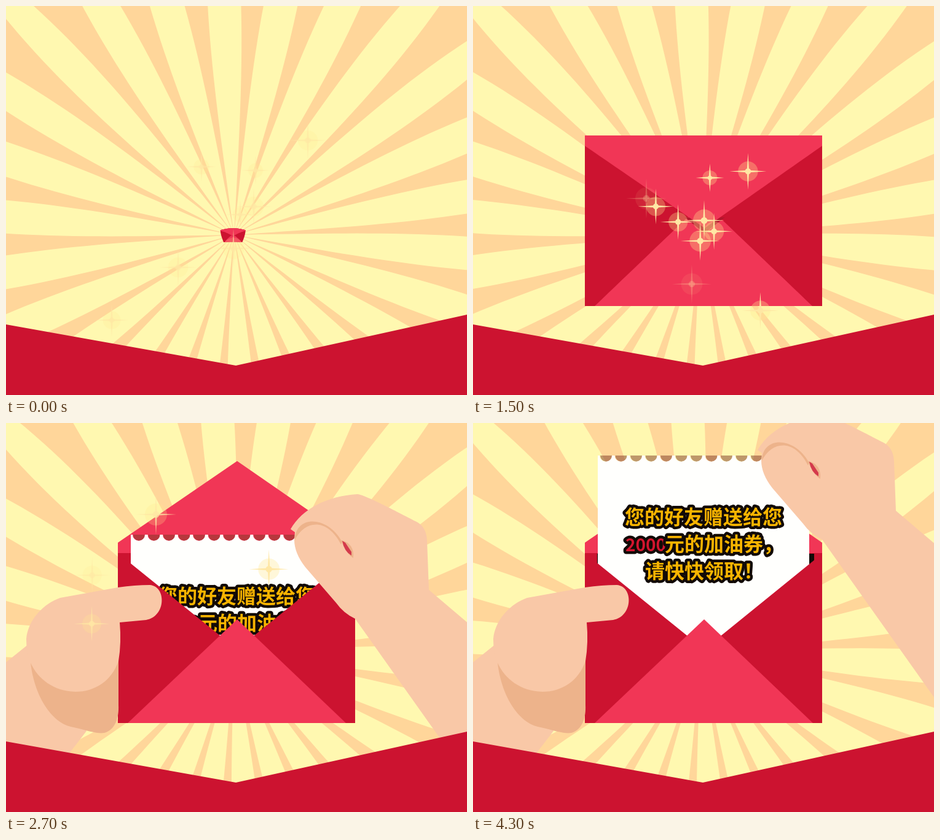
Recreate the animation shown at these times as an HTML page with a canvas. Size 750 px wide and 634 px high, loop 4.4 s.

```html
<!DOCTYPE html>
<html lang="zh">
<head>
<meta charset="utf-8">
<style>
html, body { margin: 0; width: 100%; height: 100%; overflow: hidden; background: #cc1330; }
canvas { display: block; }
</style>
</head>
<body>
<canvas id="stage" width="750" height="634"></canvas>
<script>
const ctx = document.getElementById('stage').getContext('2d');
const LOOP = 4400, STEP = 100;
const RED = '#cc1330', PINK = '#f13656', SKIN = '#f9c8a7', SHADE = '#edb38b';
const FONT = '"Noto Sans CJK SC", "Noto Sans CJK", sans-serif';

const clamp = x => Math.max(0, Math.min(1, x));
const mix = (a, b, p) => a + (b - a) * p;
const ramp = (t, from, to) => clamp((t - from) / (to - from));
const smooth = (t, from, to) => { const p = ramp(t, from, to); return p * p * (3 - 2 * p); };

// Interpolates [time, value] pairs
function along(keys, t) {
  let i = 0;
  while (i < keys.length - 2 && t >= keys[i + 1][0]) i++;
  const [t0, a] = keys[i], [t1, b] = keys[i + 1];
  return mix(a, b, ramp(t, t0, t1));
}

function poly(points, color) {
  ctx.beginPath();
  points.forEach(([x, y]) => ctx.lineTo(x, y));
  ctx.fillStyle = color;
  ctx.fill();
}

function shape(path, color) {
  ctx.fillStyle = color;
  ctx.fill(new Path2D(path));
}

function disc(x, y, r) {
  ctx.beginPath();
  ctx.arc(x, y, r, 0, 7);
  ctx.fill();
}

function shifted(dx, dy, draw) {
  ctx.save();
  ctx.translate(dx, dy);
  draw();
  ctx.restore();
}

// Sunburst: 26 stripes that widen with distance from the centre
const turnKeys = [[0, -2.4], [6, -13.8], [11, -23.5], [20, -38.2], [27, -45.6], [38, -65.7], [43, -72.5]];

function drawRays(t) {
  const period = 360 / 26, turn = along(turnKeys, t);
  ctx.fillStyle = '#fff8b0';
  ctx.fillRect(0, 0, 750, 634);
  for (let k = 0; k < 26; k++) {
    const middle = turn + (k + 0.5) * period, left = [], right = [];
    for (let r = 0; r <= 680; r += 20) {
      const half = Math.min(13, 2.86 + 9.9e-7 * r ** 2.5) / 2;
      const at = deg => [371 + r * Math.sin(deg * Math.PI / 180), 373 - r * Math.cos(deg * Math.PI / 180)];
      left.push(at(middle - half));
      right.unshift(at(middle + half));
    }
    poly(left.concat(right), '#ffd69a');
  }
}

// Closed envelope, bent while it flies in and flat afterwards
function drawClosed(t) {
  const k = Math.min(1, (41 + 25.4 * t + 1.9 * t * t) / 550);
  const flat = smooth(t, 11, 15), bend = 1 - flat;
  const cx = mix(369 + 3 * k, 375, flat);
  const halfTop = mix(275 * k, 193, flat), halfBottom = mix(203 * k, 193, flat);
  const top = mix(375 - 172 * k, 211, flat), bottom = mix(375 + 128 * k, 489, flat);
  const place = (u, v) => {
    const half = mix(halfTop, halfBottom, v ** 1.6);
    const y = mix(top + 41 * k * bend * u * u, bottom + 7 * k * bend * u * u, v);
    return [cx + u * half, y + 0.035 * bend * (bottom - top) * Math.sin(Math.PI * v) * (1 - u * u)];
  };
  const panel = (corners, color) => {
    const points = [];
    corners.forEach(([u, v], i) => {
      const [u2, v2] = corners[(i + 1) % corners.length];
      for (let s = 0; s < 16; s++) points.push(place(mix(u, u2, s / 16), mix(v, v2, s / 16)));
    });
    poly(points, color);
  };
  panel([[-1, 0], [1, 0], [1, 1], [-1, 1]], RED);
  panel([[-0.917, 1], [0, 0.39], [0.917, 1]], PINK);
  panel([[-0.16, 0.48], [0.01, 0.572], [0.18, 0.48]], '#b3162d');
  panel([[-1, 0], [1, 0], [1, 0.061], [0.01, 0.543], [-1, 0.061]], PINK);
}

function drawLine(text, x, y, color, size) {
  ctx.font = `700 ${size}px ${FONT}`;
  ctx.fillStyle = color;
  ctx.strokeText(text, x, y);
  ctx.fillText(text, x, y);
}

function drawCard() {
  const notches = Array.from({ length: 14 }, (_, i) => 216 + 24.5 * i);
  ctx.fillStyle = 'rgba(125, 55, 35, .5)';
  notches.forEach(x => {
    ctx.beginPath();
    ctx.arc(x + 1, 182, 10, 0, Math.PI);
    ctx.fill();
  });
  ctx.beginPath();
  ctx.moveTo(203, 182);
  notches.forEach(x => ctx.arc(x, 182, 10, Math.PI, 0, true));
  ctx.lineTo(547, 182);
  ctx.lineTo(547, 520);
  ctx.lineTo(203, 520);
  ctx.fillStyle = '#fffffd';
  ctx.fill();

  ctx.strokeStyle = '#120a06';
  ctx.lineWidth = 9;
  ctx.lineJoin = 'round';
  const gold = '#f8b400';
  drawLine('您的好友赠送给您', 247, 294, gold, 32);
  drawLine('2000', 248, 338, '#d4152f', 28);
  drawLine('元的加油券，', 312, 338, gold, 32);
  drawLine('请快快领取！', 280, 382, gold, 32);
}

function drawOpen(t, lift) {
  const p = smooth(t, 20, 24);
  const shoulder = mix(228, 195, p), apex = mix(362, 62, p);
  const flap = () => poly([[182, 212], [182, shoulder], [376, apex], [568, shoulder], [568, 212]], PINK);
  ctx.fillStyle = RED;
  ctx.fillRect(182, 211, 386, 278);
  if (apex <= 212) flap();
  if (t >= 24) {
    if (lift < -60) {
      ctx.fillStyle = '#120a06';
      ctx.fillRect(202, 213, 353, 17);
    }
    ctx.save();
    ctx.beginPath();
    ctx.rect(0, 0, 750, 489);
    ctx.clip();
    shifted(0, lift, drawCard);
    ctx.restore();
  }
  poly([[182, 212], [376, 369], [568, 213], [568, 489], [182, 489]], RED);
  poly([[198, 489], [376, 320], [553, 489]], PINK);
  if (apex > 212) flap();
}

function drawLeftHand() {
  shape('M-300 620 L0 390 L36 361 L131 502 L104 537 L40 610 Z', SKIN);
  shape('M40 390 C45 440 72 490 110 496 C135 502 150 507 160 505 C178 500 184 480 183 460 V380 Z', SHADE);
  shape('M33 352 C36 320 62 294 88 285 L182 268 Q210 264 234 264 C261 266 261 315 228 321 ' +
    'L185 325 Q188 358 183 388 C172 420 145 438 113 438 C77 437 52 417 40 391 Q33 376 33 352 Z', SKIN);
}

function drawRightHand() {
  shape('M463 173 C482 140 522 119 572 116 C585 117 650 152 666 160 Q684 168 685 192 L688 272 ' +
    'L1100 622 V1070 L568 319 Q549 310 537 293 L487 235 Q469 212 469 190 L470 178 Z', SKIN);
  shape('M470 190 C471 150 523 150 547 194 L545 198 C524 156 488 156 470 190 Z', SHADE);
  shape('M545 191 Q567 196 565 220 Q554 214 545 191 Z', SHADE);
  shape('M547 192 L552 195 L562 210 V216 Q550 209 547 192 Z', '#d43a4c');
}

// [size, start, end, x and y at the start, x and y at the end]
const sparkles = [
  [21, 0, 13, 318, 262, 255, 169],
  [20, 0, 13, 406, 268, 444, 165],
  [27, 0, 9, 491, 219, 548, 151],
  [27, 0, 24, 403, 327, 474, 235],
  [20, 0, 24, 381, 340, 388, 244],
  [27, 0, 5, 280, 426, 242, 461],
  [24, 0, 4, 172, 512, 140, 540],
  [29, 0, 16, 370, 395, 355, 457],
  [27, 4, 22, 399, 387, 511, 566],
  [27, 4, 24, 380, 358, 402, 375],
  [30, 8, 16, 352, 346, 272, 309],
  [30, 13, 30, 398, 383, 211, 99],
  [26, 9, 29, 376, 366, 114, 235],
  [26, 13, 30, 366, 356, 91, 321],
  [29, 13, 31, 360, 407, 447, 190]
];

function drawSparkle(t, [size, start, end, x0, y0, x1, y1]) {
  if (t < start || t >= end) return;
  const p = ramp(t, start, end), x = mix(x0, x1, p), y = mix(y0, y1, p);
  const fadeIn = start ? clamp((t - start + 1) / 3) : 0.6 + 0.4 * clamp(t / 6);
  ctx.globalAlpha = fadeIn * clamp((end - t) / 4);
  ctx.fillStyle = 'rgba(255, 230, 140, .32)';
  disc(x, y, size * 0.6);
  ctx.beginPath();
  for (let i = 0; i < 8; i++) {
    const r = i % 2 ? 2.4 : size + 3, a = i * Math.PI / 4;
    ctx.lineTo(x + r * Math.cos(a), y + r * Math.sin(a));
  }
  ctx.fillStyle = '#ffe7a4';
  ctx.fill();
  disc(x, y, size * 0.18);
  ctx.globalAlpha = 1;
}

function frame() {
  const t = Math.floor(performance.now() % LOOP / STEP);
  const lift = along([[25, 40], [27, 0], [33, -129]], t);
  drawRays(t);
  if (t <= 20) drawClosed(t);
  else drawOpen(t, lift);
  if (t > 21) {
    const away = 1 - smooth(t, 21, 25);
    shifted(-280 * away, 120 * away, drawLeftHand);
    shifted(320 * away, lift + 120 * away, drawRightHand);
  }
  poly([[0, 519], [374, 586], [750, 503], [750, 634], [0, 634]], RED);
  sparkles.forEach(s => drawSparkle(t, s));
  requestAnimationFrame(frame);
}
frame();
</script>
</body>
</html>
```
